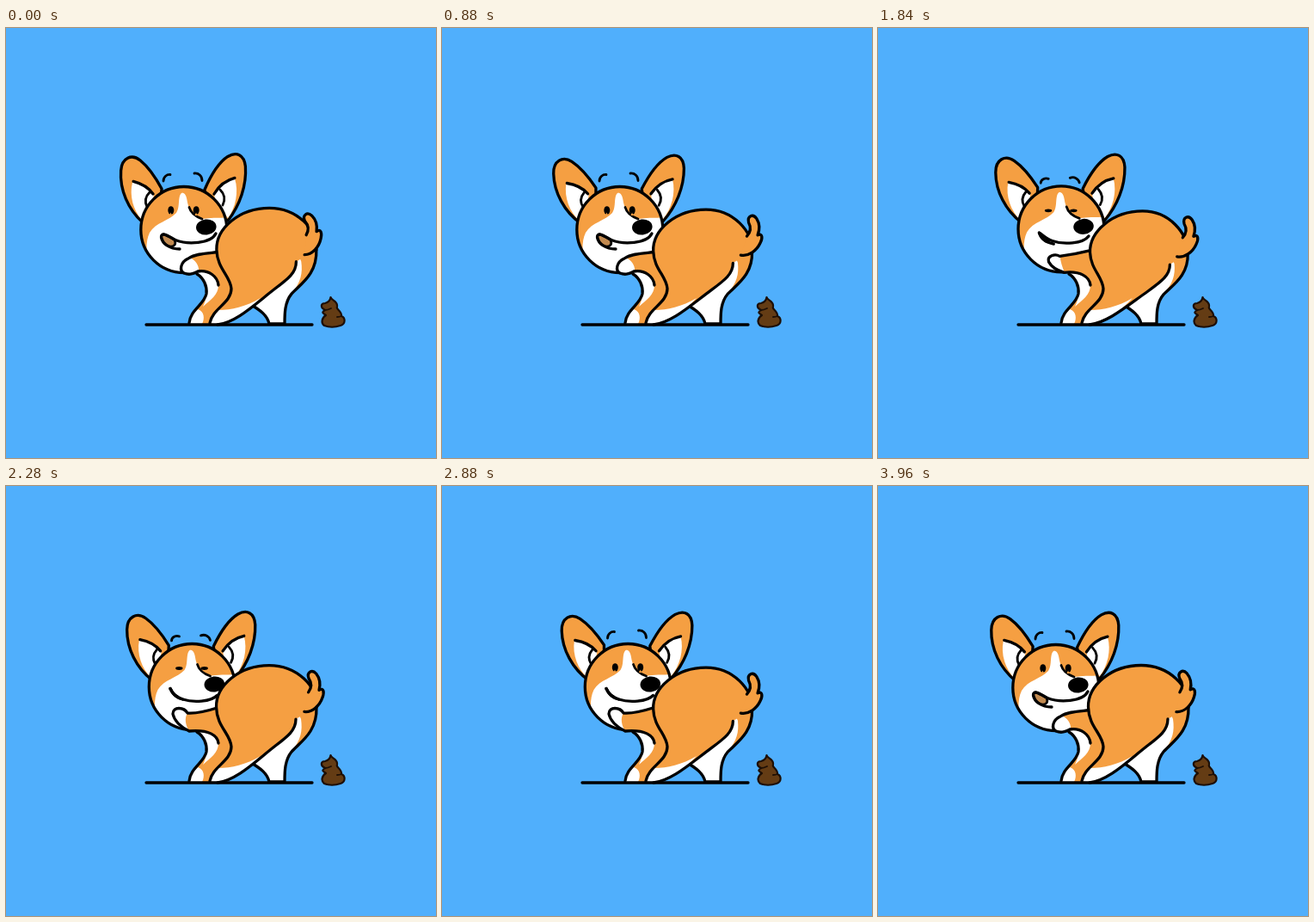
Write an HTML page that moves like this. It is 500 px wide and 500 px high and loops after 4 s.

```html
<!DOCTYPE html>
<html lang="en">
<head>
<meta charset="utf-8">
<title>Wiggling corgi</title>
<style>
  html, body { margin: 0; width: 100%; height: 100%; overflow: hidden; background: #50affc; }
  svg { display: block; width: 100%; height: 100%; }
  .line { fill: none; stroke: #000; stroke-width: 3.3; stroke-linecap: round; stroke-linejoin: round; }
  .thin { stroke-width: 2.8; }
  .orange { fill: #f59f42; }
  .white { fill: #fff; }
</style>
</head>
<body>
<svg viewBox="0 0 500 500">
  <defs>
    <clipPath id="face"><circle cx="206.800" cy="234.500" r="50"/></clipPath>
  </defs>

  <g id="head">
    <g id="earL">
      <path class="line orange" d="M159 226C142 211 132 188 133.500 166C134.500 151 146 146 156 154C166 162 174 174 181 187L178 215Z"/>
      <path class="white" d="M147 179C158 180 166 187 172 194L166 222L158 223C148 212 143 195 147 179Z"/>
      <path class="line" d="M148 178.500C158 181 166 186 171 193"/>
      <path class="line thin" d="M167 191C162 196 161 202 164 208"/>
    </g>
    <g id="earR">
      <path class="line orange" d="M231 188C238 172 248 156 258 149.500C268 143.500 277 147 278.500 161C280 183 272 206 258 224L236 214Z"/>
      <path class="white" d="M266 175C271 190 267 209 258 221L244 203L242 193C248 183 257 177 266 175Z"/>
      <path class="line" d="M242 193C248 183 256 177 266 174.500"/>
      <path class="line thin" d="M249 188C255 194 255 200 252 206"/>
    </g>
    <circle class="white" cx="206.800" cy="234.500" r="50"/>
    <g clip-path="url(#face)" class="orange">
      <path d="M150 180H205V191.500C199 194 203 208 198 215C190 224 174 226 167 238C163 246 163 256 164 268L150 262Z"/>
      <path d="M204 180H265V220C250 221 239 220 228 222C218 219 213 212 211 203C210 195 208 191.500 204.500 191.500Z"/>
    </g>
    <circle class="line" cx="206.800" cy="234.500" r="50"/>
    <path class="line thin" d="M213 208.500C214.500 214 219.500 219 228 222"/>
    <path id="mouth" class="line thin" style="fill:#c28a50"/>
    <path id="lip" class="line"/>
    <path id="smile" class="line"/>
    <ellipse cx="232.800" cy="231.500" rx="11.800" ry="9" transform="rotate(-6 232.800 231.500)"/>
    <ellipse class="eye" cx="191.800"/><ellipse class="eye" cx="221.200"/>
    <path id="glint" class="orange" d="M190 218L191.500 214.500L193 218ZM219.500 218L221 214.500L222.500 218Z"/>
    <path id="brows" class="line thin"/>
  </g>

  <path id="hind" class="white"/>
  <path id="rump" class="orange"/>
  <path id="hindLine" class="line"/>

  <path class="orange" d="M220 284C229 290 234 299 233 309C231 321 214 330 213 344H240L264 304L250 262Z"/>
  <path class="white" d="M220 284C236 281 246 289 247 299C247 310 238 316 229 324C235 313 235 296 220 284Z"/>
  <path class="white" d="M213 344C214 337 218 331 223 327C231 330 231 338 228 344Z"/>
  <path class="line" d="M222 286C230 291 234 300 233 309C231 321 214 328 213 343"/>
  <path id="arm" class="orange"/>
  <path id="paw" class="white"/>
  <path id="armLine" class="line"/>

  <path id="body" class="orange"/>
  <path class="white" d="M247 328C262 328 279 324 296 314C280 331 266 342 246 345L237 343C239 337 243 332 247 328Z"/>
  <path id="bodyLine" class="line"/>
  <g id="tail">
    <path class="line orange" stroke-dasharray="none" d="M349 240C353 233 351 228 347.500 224C344 217 350 212.500 355.500 217.500C361 223 362 229 361 236C366 232 367.500 238 366 244C364 254 356 263 347 263"/>
  </g>

  <path class="line" d="M163 345H356"/>
  <path class="line" style="fill:#643c14;stroke:#1d0f05;stroke-width:2.200" d="M377.500 313C378 317 386 317 385 324C383 327 391 329 390 335C395 337 395 344 389 346C383 348 375 348 370 346C366 343 367 337 372 334C369 332 366 331 371 328C365 325 366 320 371 320C375 319 377 317 377.500 313Z"/>
  <path class="line" style="stroke:#1d0f05;stroke-width:1.800" d="M371 328C374 328 376 327 378 326M385 336Q388 336 390 335"/>
</svg>
<script>
const LOOP = 4000, SHAKE = 1000 / 3;
const $ = id => document.getElementById(id);
const eyes = document.querySelectorAll('.eye');

// Blend two paths that share the same commands.
function mix(a, b, k) {
  const ends = b.match(/-?[\d.]+/g);
  let i = 0;
  return a.replace(/-?[\d.]+/g, n => (+n + (ends[i++] - n) * k).toFixed(2));
}

function ease(t, from, to) {
  const x = Math.min(1, Math.max(0, (t - from) / (to - from)));
  return x * x * (3 - 2 * x);
}

const pulse = (t, a, b, c, d) => ease(t, a, b) - ease(t, c, d);
const wave = (t, peak) => Math.cos(2 * Math.PI * (t / SHAKE - peak));
const shape = (id, d) => $(id).setAttribute('d', d);
const move = (id, value) => $(id).setAttribute('transform', value);

// Each pair holds the two extreme poses of a part.
const thigh = ['M246 345C268 342 288 322 312 303C328 291 337 284 337 271',
               'M246 345C268 342 289 324 314 307C331 295 340 288 340 276'];
const edge = ['361 257', '360 263'];
const back = ['C363 233 338 208.500 306 208.500C271 208.500 244 232 244.500 257C245 280 261 288 262 303C262 320 240 326 237 343',
              'C360 240 339 214 308 214C273 214 246 238 247 262C248 281 261 289 262 303C262 320 240 326 237 343'];
const haunch = ['M361 257C362 286 343 297 332 309C324 319 324 332 324 344',
                'M360 263C361 288 343 299 332 310C324 319 324 332 324 344'];
const rump = ['M361 257C362 286 343 297 332 309C343 295 345 285 343 271L337 257Z',
              'M360 263C361 288 343 299 332 310C343 297 346 288 345 275L340 263Z'];
const smile = ['M180.500 243C181 236 190 243 197 246.500C211 252 238 251 244 239',
               'M181.500 236.500C183 240 186 246 196 249C208 253 229 252 236 244.500'];
const lip = ['M180.500 243C182 251 190 257 202 257', 'M181.500 236.500C183 240 186 246 196 249'];
const mouth = ['M180.500 243C181 236 190 243 196 246.500C198 251 196 255 190 254C184 252 181 248 180.500 243Z',
               'M181.500 236.500C183 240 186 245 190 246.800C190 247 189 246 188 245.500C185 243 183 240 181.500 236.500Z'];
const brows = ['M183 178C183 173 187 170 191 170.500M219 169C224 168.500 228 172 228 177.500',
               'M183 181C183 177 188 174.500 192 176M217 175C222 173 227 176 228 180.500'];
const arm = ['M247 260.500C235 262 221 262 212 268C203 272 201 282 207 285C214 288 219 285 223 283C236 281 246 289 247 299',
             'M247 257.500C236 261 222 265 211 264C207 257 194 256 194 265C196 274 205 281 213 285C236 283 246 290 247 299'];
const paw = ['M214 267C204 271 201 282 207 285C214 288 219 285 224 283C225 276 220 270 214 267Z',
             'M211 264C207 257 194 256 194 265C196 274 205 281 213 285C209 279 207 270 211 264Z'];

function draw(t) {
  const turn = pulse(t, 1720, 1920, 3720, 3920);
  const squint = pulse(t, 1330, 1450, 2270, 2400);
  const drop = (1 + wave(t, .38)) / 2;
  const ear = wave(t, .16);

  move('head', `translate(${9.5 * turn} ${-turn})`);
  move('earL', `rotate(${3.6 * ear - 1.8} 168 208)`);
  move('earR', `rotate(${-2.4 * ear + 1.2} 246 208)`);
  shape('smile', mix(...smile, turn));
  shape('lip', mix(...lip, turn));
  shape('mouth', mix(...mouth, turn));

  for (const eye of eyes) {
    eye.setAttribute('cy', 212 + squint);
    eye.setAttribute('rx', 3.5 + .7 * squint);
    eye.setAttribute('ry', 4.8 - 2.9 * squint);
  }
  $('glint').setAttribute('opacity', 1 - squint);
  shape('brows', mix(...brows, squint));

  const rear = mix(...haunch, drop) + 'H306C304 334 295 328 287 323';
  const leg = mix(...thigh, drop);
  const top = mix(...edge, drop) + mix(...back, drop);
  shape('hind', rear + 'L335 268Z');
  shape('rump', mix(...rump, drop));
  shape('hindLine', rear);

  const armPath = mix(...arm, turn);
  shape('arm', armPath + 'L256 276Z');
  shape('paw', mix(...paw, turn));
  shape('armLine', armPath);

  shape('body', leg + 'L' + top + 'Z');
  shape('bodyLine', leg + 'M' + top);
  move('tail', `translate(${drop} ${4.8 * drop}) rotate(${7.5 * wave(t, .62) + 5.5} 352 262)`);
}

function tick(now) {
  draw(now % LOOP);
  requestAnimationFrame(tick);
}
draw(0);
requestAnimationFrame(tick);
</script>
</body>
</html>
```
